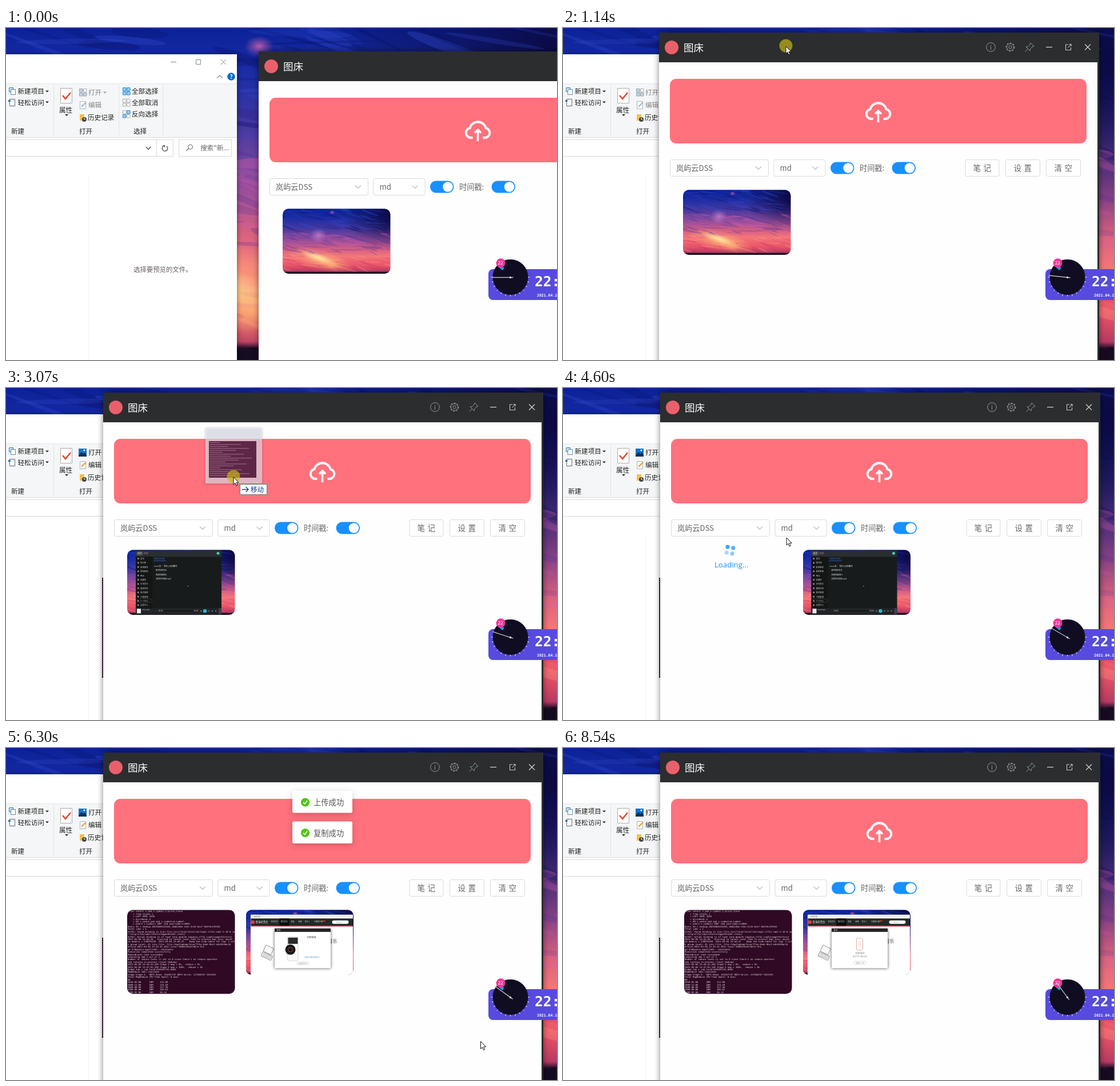
These frames come from a looping animation (964 by 581 pixels, 9.55 s). An HTML page with a canvas:

```html
<!DOCTYPE html>
<html lang="zh">
<head>
<meta charset="utf-8">
<style>
html, body { margin: 0; height: 100%; overflow: hidden; }
canvas { display: block; }
</style>
</head>
<body>
<canvas id="stage" width="964" height="581"></canvas>
<script>
const W = 964, H = 581, LOOP = 9550;
const SANS = '"Noto Sans CJK SC", "Noto Sans CJK", "Noto Sans", sans-serif';
const MONO = '"DejaVu Sans Mono", monospace';
const screen = document.getElementById('stage').getContext('2d');
let c = screen;

// ---------- helpers ----------
const clamp = v => Math.max(0, Math.min(1, v));
const smooth = p => { p = clamp(p); return p * p * (3 - 2 * p); };
const mix = (a, b, p) => a + (b - a) * p;
const lerp = (a, b, p) => [mix(a[0], b[0], p), mix(a[1], b[1], p)];

function rect(x, y, w, h, fill) { c.fillStyle = fill; c.fillRect(x, y, w, h); }

function box(x, y, w, h, r, fill, stroke) {
  c.beginPath(); c.roundRect(x, y, w, h, r);
  if (fill) { c.fillStyle = fill; c.fill(); }
  if (stroke) { c.strokeStyle = stroke; c.lineWidth = 1; c.stroke(); }
}
function dot(x, y, r, fill) { c.beginPath(); c.arc(x, y, r, 0, 7); c.fillStyle = fill; c.fill(); }

function ring(x, y, r, stroke, width = 1) {
  c.beginPath(); c.arc(x, y, r, 0, 2 * Math.PI);
  c.strokeStyle = stroke; c.lineWidth = width; c.stroke();
}
function line(stroke, width, ...points) {
  c.beginPath();
  for (let i = 0; i < points.length; i += 2) c.lineTo(points[i], points[i + 1]);
  c.strokeStyle = stroke; c.lineWidth = width; c.stroke();
}
// y is the vertical centre of the ideographs
function text(s, x, y, size, fill, weight = 400, family = SANS) {
  c.font = `${weight} ${size}px ${family}`;
  c.fillStyle = fill;
  c.fillText(s, x, y + size * .38);
}
function at(x, y, paint) { c.save(); c.translate(x, y); paint(); c.restore(); }

function shadowed(color, blur, dy, paint) {
  c.save();
  c.shadowColor = color; c.shadowBlur = blur; c.shadowOffsetY = dy;
  paint();
  c.restore();
}
function seeded(seed) {
  return () => (seed = (seed * 16807) % 2147483647) / 2147483647;
}

// ---------- sunset wallpaper, painted once ----------
function glow(x, y, r, squash, rgb, alpha, tilt = 0) {
  at(x, y, () => {
    c.rotate(tilt); c.scale(1, squash);
    const g = c.createRadialGradient(0, 0, 0, 0, 0, r);
    g.addColorStop(0, `rgba(${rgb},${alpha})`);
    g.addColorStop(.5, `rgba(${rgb},${alpha * .45})`);
    g.addColorStop(1, `rgba(${rgb},0)`);
    c.fillStyle = g; c.fillRect(-r, -r, 2 * r, 2 * r);
  });
}
function paintSunset() {
  const sheet = document.createElement('canvas');
  sheet.width = W; sheet.height = H;
  c = sheet.getContext('2d');
  const sky = c.createLinearGradient(0, 0, 0, H);
  [[0, '#0b2298'], [.15, '#1e2ea6'], [.3, '#4638a0'], [.42, '#7a479f'], [.52, '#a95298'], [.62, '#d8627f'],
   [.72, '#f4767a'], [.86, '#ea5569'], [.945, '#b83a62'], [.965, '#1d0d26'], [1, '#0b0614']]
    .forEach(s => sky.addColorStop(...s));
  rect(0, 0, W, H, sky);
  glow(1010, 60, 480, .65, '10,4,48', .95);
  glow(340, 450, 300, .3, '255,190,120', .9, .25);
  glow(440, 490, 120, .35, '255,190,110', .7);
  const rnd = seeded(77);
  const tints = [['9,14,95', '50,75,205'], ['215,95,170', '70,45,150'], ['255,165,135', '205,55,105']];
  for (let i = 0; i < 200; i++) {
    const x = rnd() * W, y = rnd() * H * .92, pair = tints[Math.min(2, y / H * 2.8 | 0)];
    c.fillStyle = `rgba(${pair[rnd() * 2 | 0]},${.12 + rnd() * .25})`;
    c.beginPath();
    c.ellipse(x, y, 30 + rnd() * 90, 2 + rnd() * 8, .22 + (rnd() - .5) * .5, 0, 7);
    c.fill();
  }
  glow(443, 32, 26, .7, '215,100,175', .85);
  glow(320, 430, 170, .22, '255,235,165', .95, .32);
  glow(320, 235, 80, .8, '235,150,215', .6);
  for (let x = 0; x < W; x += 9) rect(x, 556 + rnd() * 12, 10, 30, '#160b20');
  c = screen;
  return sheet;
}
const sunset = paintSunset();

// ---------- file explorer ----------
function caret(x, y, fill) {
  c.beginPath(); c.moveTo(x - 3, y - 1.5); c.lineTo(x + 3, y - 1.5); c.lineTo(x, y + 1.5);
  c.fillStyle = fill; c.fill();
}
function tiles(x, y, fills, edge) {
  fills.forEach((f, i) => box(x + .5 + (i % 2) * 7, y + .5 + (i >> 1) * 7, 5.5, 5.5, 0, f, f === '#fff' ? '#aaa' : edge));
}
function explorer(selected) {
  shadowed('rgba(0,0,0,.45)', 9, 1, () => rect(-20, 46, 424, 560, '#fff'));
  line('#888', 1, 288, 59.5, 298, 59.5);
  box(332.5, 55.5, 8, 8, 0, null, '#888');
  line('#888', 1, 376, 55, 385, 64); line('#888', 1, 385, 55, 376, 64);
  line('#888', 1.2, 369.5, 87.5, 374, 83, 378.5, 87.5);
  dot(394, 85, 6.8, '#0b6cc9'); text('?', 391.4, 85, 10, '#fff', 700);

  rect(0, 97, 404, 95, '#f5f6f7');
  rect(0, 97, 404, 1, '#e6e7e8'); rect(0, 191, 404, 1, '#d9dadb');
  for (const x of [83, 197, 274]) rect(x, 101, 1, 87, '#e0e1e3');
  const ink = '#222', pale = selected ? ink : '#838383', blue = '#2b88d0';
  [['新建项目', 20.5, 111], ['轻松访问', 20.5, 131], ['属性', 93, 144], ['历史记录', 143, 157],
   ['全部选择', 220, 111], ['全部取消', 220, 131], ['反向选择', 220, 151],
   ['新建', 9, 181], ['打开', 128, 181], ['选择', 223, 181]].forEach(([s, x, y]) => text(s, x, y, 11.6, ink));
  text('打开', 144, 113, 11.6, pale); text('编辑', 144, 135, 11.6, pale);
  caret(72, 111, ink); caret(72, 130, ink); caret(106, 152.5, ink); caret(173, 113, '#999');

  box(5.5, 104.5, 7, 7, 0, '#cfe6f7', '#2b7db8');
  box(8.5, 107.5, 8, 9, 0, '#fff', '#5d87a5');
  box(6.5, 124.5, 9, 12, 0, '#fff', '#667'); rect(4, 126, 4, 3, '#2677c9');
  box(95.5, 105.5, 20, 26, 0, '#fff', '#aaa');
  line('#e5452f', 2.6, 99, 118, 104, 124, 113, 113);
  if (selected) {
    rect(127, 106, 14, 14, '#1673c9');
    c.beginPath(); c.moveTo(127, 118); c.lineTo(132, 112); c.lineTo(135, 115); c.lineTo(138, 113); c.lineTo(141, 117);
    c.lineTo(141, 120); c.lineTo(127, 120); c.fillStyle = '#0b3157'; c.fill();
    dot(137, 109, 1.5, '#fff');
  } else tiles(128, 106, ['#c7d3dd', '#fff', '#c7d3dd', '#c7d3dd'], '#93a5b3');
  box(129.5, 128.5, 10, 13, 0, '#fff', '#a5b3bd');
  line(selected ? '#e69a1d' : '#9fb3c4', 2, 132, 138, 140, 130);
  rect(129, 151, 8, 11, '#f5c04f'); dot(137, 160, 4, '#444'); line('#fff', 1, 137, 157, 137, 160, 139, 160);
  tiles(204, 104, ['#8fd0f8', '#8fd0f8', '#8fd0f8', '#8fd0f8'], blue);
  tiles(204, 124, ['#fff', '#fff', '#fff', '#fff'], blue);
  tiles(204, 144, ['#fff', '#8fd0f8', '#8fd0f8', '#fff'], blue);

  box(-5.5, 195.5, 298, 29, 0, null, '#d9d9d9'); rect(263, 196, 1, 28, '#d9d9d9');
  line('#555', 1.3, 245, 208, 249, 212.5, 253, 208);
  c.beginPath(); c.arc(278, 210.5, 4.8, -.9, 4.1); c.strokeStyle = '#555'; c.lineWidth = 1.3; c.stroke();
  line('#555', 1.3, 274, 206, 277.5, 206, 277.5, 209);
  box(302.5, 195.5, 92, 29, 0, null, '#d9d9d9');
  ring(322.5, 208, 4, '#666'); line('#666', 1.2, 319.5, 211, 315.5, 215);
  text('搜索"新...', 340, 210, 11.6, '#666');
  rect(144, 260, 1, 321, '#f4f4f4');
  if (selected) {
    rect(168, 332, 200, 175, '#300a24');
    for (let y = 334; y < 505; y += 4) rect(168, y, 1, 2, '#8d7085');
  } else text('选择要预览的文件。', 223, 423, 11.4, '#6b5f60');
}

// ---------- thumbnails ----------
const NAV = ['首页', '排行榜', '歌单推荐', '最新歌曲', '电台', '收藏夹', '本地音乐', '播放列表', '最近播放', '下载管理', '个人中心', '设置中心'];
const LOG = `hive> select s.ymd,s.symbol,s.price_close
    > from stocks s
    > LEFT SEMI JOIN
    > dividends d
    > ON s.ymd=d.ymd and s.symbol=d.symbol
    > where s.symbol='IBM' and year(ymd)>=2000;
Query ID = hadoop_20210404134341_3babc9de-124c-4c33-bec7-5b4f8c193354
Total jobs = 1
SLF4J: Found binding in [jar:file:/usr/local/hive/lib/log4j-slf4j-impl-2.10.0.ja
r!/org/slf4j/impl/StaticLoggerBinder.class]
SLF4J: Actual binding is of type [org.apache.logging.slf4j.Log4jLoggerFactory]
2021-04-04 13:44:36   Starting to launch local task to process map join; maxim
um memory = 239075328  2021-04-04 13:44:37    Dump the side-table for tag: 1 wit
h group count: 41 into file: file:/tmp/hadoop/hive/7f4a-4ede-9bc2-e4e3638ac14
d/hive_2021-04-04_13-43-41_301/-local-10004/HashTable-Sta
ge-3/MapJoin-mapfile01--.hashtable
Execution completed successfully
MapredLocal task succeeded
Launching Job 1 out of 1
Number of reduce tasks is set to 0 since there's no reduce operator
Job running in-process (local Hadoop)
2021-04-04 13:44:41,206 Stage-3 map = 0%,  reduce = 0%
2021-04-04 13:47:01,186 Stage-3 map = 100%,  reduce = 0%
Ended Job = job_local1539397741_0002
MapReduce Jobs Launched:
Stage-Stage-3:  HDFS Read: 116367747 HDFS Write: 117588747 SUCCESS
Total MapReduce CPU Time Spent: 0 msec
OK
2010-02-08      IBM     121.88
2009-11-06      IBM     123.49
2009-08-06      IBM     117.38
2009-05-06      IBM     104.62
2009-02-06      IBM     96.14`.split('\n');

function thumb(x, y, h, paint) {
  at(x, y, () => { c.beginPath(); c.roundRect(0, 0, 188.5, h, 10); c.clip(); paint(); });
}
function wallpaper() { c.drawImage(sunset, 0, 0, 188.5, 115.5); }

function player() {
  wallpaper();
  rect(15, 1, 150, 112, '#181b1b'); rect(15, 1, 150, 11, '#2a2e31'); rect(15, 12, 29, 90, '#141616');
  box(16, 3, 12, 7, 3, '#444a4c');
  text('音乐', 18, 6.5, 4, '#ddd'); text('视频', 29, 6.5, 4, '#888');
  dot(159, 6, 2.5, '#4fc3b0');
  NAV.forEach((s, i) => { rect(18, 14 + i * 7.4, 2.5, 2.5, '#999'); text(s, 23, 15.5 + i * 7.4, 3.4, '#ccc'); });
  box(17.5, 85.5, 26, 6.5, 3, null, '#333');
  text('我的音乐列表', 47, 15.5, 3.2, '#2b78e0'); rect(46, 18.5, 22, 1, '#1d5cb8');
  text('music歌', 47, 28, 3.2, '#ddd'); text('· 我的心动歌单', 60, 28, 3.2, '#ddd'); text('推荐', 81, 28, 3.2, '#ddd');
  ['夜空的轻音乐', '周末的旋律01', '清晨的吉他曲.mp3'].forEach((s, i) => text(s, 50, 35.5 + i * 7.6, 3.2, '#eee'));
  dot(106.5, 63.5, .8, '#bbb');
  rect(15, 102, 150, 10.5, '#222527'); rect(17, 103, 7, 8, '#eee');
  text('music.mp3', 26, 105, 2.6, '#ddd'); text('00:00', 55, 107, 2.8, '#ddd'); text('03:50', 117, 107, 2.8, '#ddd');
  rect(64, 106.5, 51, 1, '#050505');
  dot(136, 107, 3.3, '#25b4d0');
  for (const x of [129, 143, 149, 155]) dot(x, 107, 1, '#999');
  rect(160, 102, 5, 10.5, '#3c4150');
}
function website(scanned) {
  wallpaper();
  rect(8.5, 8.5, 179, 107, '#fff');
  rect(8.5, 8.5, 179, 5.5, '#eef0f2'); text('网页标题', 14, 11.5, 2.8, '#444');
  rect(9, 15, 178.5, 13, '#272727'); rect(59, 15, 17, 13, '#0b0b0b');
  dot(12.5, 21.5, 3.2, '#e33a3f'); text('青禾听音台', 17, 21.5, 4.4, '#fff');
  ['发现音乐', '我的音乐', '朋友', '商城', '音乐人', '下载客户端'].forEach((s, i) =>
    text(s, [44, 61, 79, 92, 103, 119][i], 21, 3.1, '#ddd'));
  rect(134, 18.5, 5, 2, '#d63232');
  box(151, 18.5, 29, 6, 3, '#fff'); text('搜索音乐', 158, 21.5, 2.8, '#999');
  rect(9, 28, 178.5, 1.2, '#c33');
  at(38, 77, () => {
    c.rotate(.45); box(-9, -13, 15, 12, 1, '#fafafa', '#999'); box(-9, 0, 19, 8, 1, '#eee', '#999');
    for (let i = 0; i < 3; i++) line('#aaa', .6, -7, 2 + i * 2, 8, 2 + i * 2);
  });
  text('听音乐', 136, 55, 8, '#444');
  shadowed('rgba(0,0,0,.7)', 5, 1, () => rect(50.5, 32.5, 98, 69.5, '#fff'));
  rect(50.5, 32.5, 98, 6, '#222'); text('登录', 54, 35.5, 3.4, '#fff');
  if (scanned) {
    box(94, 49.5, 11, 21, 2, '#fff', '#e9a9a0'); rect(96, 55, 7, 9, '#fbeeea');
    text('扫码成功', 92, 76, 4, '#777'); text('请在手机上确认登录', 87, 82, 2.9, '#888');
    box(89, 90, 22, 5, 2, '#fff', '#ddd'); text('返回上一步', 93, 92.5, 2.8, '#777');
  } else {
    box(73, 47, 18.5, 42, 2, '#fafafa', '#d8d8d8');
    rect(74, 48.5, 17, 11, '#2a2a2a'); dot(78, 69.5, 9, '#151515'); ring(78, 69.5, 4, '#b85a5a', .8);
    text('扫码登录', 107, 48, 4, '#333');
    text('使用手机客户端扫码', 103, 83, 2.8, '#3b78c0');
    box(89, 91, 22, 5, 2, '#fff', '#ddd'); text('其他登录方式', 92, 93.5, 2.6, '#777');
  }
}
function terminal() {
  rect(0, 0, 189, 150, '#300a24');
  LOG.forEach((s, i) => text(s, 1, 2.6 + i * 4.42, 3.9, '#e6dfe4', 400, MONO));
}

// ---------- upload window ----------
const CLOUD = new Path2D('M-9 12H-12A8.6 8.6 0 0 1-14-5A14.5 14.5 0 0 1 14-5A8.6 8.6 0 0 1 12 12H9');

function titleIcons() {
  const g = '#999';
  ring(580.5, 25.5, 7.8, g); rect(580, 24, 1, 6, g); rect(580, 21.5, 1, 1.5, g);
  ring(614.5, 25.5, 2.6, g); ring(614.5, 25.5, 6, g, .9);
  c.setLineDash([2.6, 2.9]); ring(614.5, 25.5, 7.2, g, 1.3); c.setLineDash([]);
  line(g, 1, 650, 18, 656, 24, 653, 25, 649.5, 28.5, 649, 32, 642, 25, 645.5, 24.5, 649, 21, 650, 18);
  line(g, 1, 645.5, 28.5, 640.5, 33.5);
  line('#d8d8d8', 1.2, 677, 25.5, 688, 25.5);
  line('#c8c8c8', 1.1, 716, 21, 711.5, 21, 711.5, 30.5, 720.5, 30.5, 720.5, 26);
  line('#c8c8c8', 1.1, 715.5, 26.5, 721, 20.5); line('#c8c8c8', 1.1, 717.5, 20.5, 721, 20.5, 721, 24);
  line('#d8d8d8', 1.1, 745, 20.5, 755, 30.5); line('#d8d8d8', 1.1, 755, 20.5, 745, 30.5);
}
const LABEL = '#666';
function select(x, w, label) {
  box(x + .5, 222.5, w, 29, 3, '#fff', '#d9d9d9');
  text(label, x + 11, 237, 13.2, LABEL, 300);
  line('#bbb', 1.1, x + w - 22, 234.5, x + w - 17, 239.5, x + w - 12, 234.5);
}
function toggle(x) { box(x, 226.5, 41.5, 21, 10.5, '#1890ff'); dot(x + 31, 237, 8.8, '#fff'); }

function button(x, w, label) {
  box(x + .5, 222.5, w, 29, 3, '#fff', '#d9d9d9');
  text(label[0], x + w / 2 - 15.5, 237, 13.5, LABEL, 300);
  text(label[1], x + w / 2 + 2.5, 237, 13.5, LABEL, 300);
}
function spinner(t) {
  at(292, 284, () => {
    c.rotate((10 + (t - 4600) * .3) * Math.PI / 180);
    [[-5, -5], [5, -5], [5, 5], [-5, 5]].forEach(([x, y], i) => {
      c.globalAlpha = .3 + .6 * Math.abs(1 - (((t - 4700) / 1000 + i * .4 + 20) % 2));
      dot(x, y, 3.6, '#1890ff');
    });
  });
  text('Loading...', 265, 309, 13.2, '#1890ff', 400, '"Open Sans", sans-serif');
}
function uploader(t) {
  shadowed('rgba(0,0,0,.5)', 10, 0, () => rect(0, 0, 770, 620, '#2c2d2f'));
  rect(0, 52, 767, 560, '#fefefe');
  dot(22, 26, 12, '#e9606b');
  text('图床', 43, 26, 17.6, '#fff');
  titleIcons();
  box(19, 81, 729, 113, 11, '#ff717c');
  at(383.5, 139, () => {
    c.strokeStyle = '#fff'; c.lineWidth = 4; c.stroke(CLOUD);
    line('#fff', 3.6, 0, 18, 0, -2); line('#fff', 3.6, -5.5, 3.5, 0, -2, 5.5, 3.5);
  });
  select(19, 172, '岚屿云DSS');
  select(200.5, 90, 'md');
  toggle(300); text('时间戳:', 351, 237, 13.2, LABEL, 300); toggle(407.5);
  button(535.5, 59, '笔记'); button(606, 60, '设置'); button(677, 60, '清空');
  const gallery = t < 1450 ? wallpaper : t < 5380 ? player : () => website(t > 7760);
  thumb(t < 3600 ? 42 : 249.5, 275.3, 113.7, gallery);
  if (t >= 5160) thumb(42, 275.3, 147, terminal);
}
function toast(t, label, y, from, to) {
  const show = Math.min(smooth((t - from) / 250), 1 - smooth((t - to) / 300));
  if (show <= 0) return;
  at(0, y - 22 * (1 - show), () => {
    c.globalAlpha = show;
    shadowed('rgba(0,0,0,.2)', 12, 3, () => box(501, 0, 105, 38.5, 3, '#fff'));
    dot(523.5, 20, 7.6, '#52c41a');
    line('#fff', 1.6, 520, 20, 522.7, 23, 527, 17);
    text(label, 538, 20, 13.3, '#555', 300);
  });
}

// ---------- clock widget ----------
function clock(t) {
  box(844, 422, 140, 54, 8, '#574bdf');
  at(882.5, 436, () => {
    shadowed('rgba(0,0,0,.2)', 4, 0, () => dot(0, 0, 31, '#100d22'));
    for (let a = 0; a <= 12; a++) {
      const r = a * Math.PI / 12, x = Math.cos(r), y = Math.sin(r);
      line('#fff', 1, x * 31, y * 31, x * 33.8, y * 33.8);
    }
  });
  line('#1a9cf2', 5, 862, 415, 870, 422);
  dot(865.5, 411.3, 8, '#f2349b'); text('22', 860.8, 411.3, 8, '#fff');
  at(882.5, 436.5, () => {
    c.rotate(Math.floor((t + 470) / 1000) * Math.PI / 30);
    line('#b9b9bd', 1.4, -33, 0, 5, 0); dot(0, 0, 1.6, '#fff');
  });
  text('22:', 925, 443, 24.5, '#fff', 700, MONO);
  text('2021.04.17', 929, 467.5, 6.5, '#fff', 700, MONO);
}

// ---------- pointer ----------
const GRAB = [222, 24], FILE = [-20, 305], DROP = [398, 156], REST = [391, 262];
const ARROW = new Path2D('M0 0V13L3 10.2L5 15L7.2 14L5.2 9.4H9.2Z');

// whole pixels, as a desktop moves its windows
function windowAt(t) {
  const pos = t < 990 ? lerp([442, 41], [161, 9], smooth((t - 70) / 920))
                      : lerp([161, 9], [170, 8], smooth((t - 990) / 230));
  return pos.map(Math.round);
}
function pointerAt(t, win) {
  if (t < 1300) return [win[0] + GRAB[0], win[1] + GRAB[1]];
  if (t < 2380) return lerp([392, 32], FILE, smooth((t - 1300) / 550));
  if (t < 3530) return lerp(FILE, DROP, smooth((t - 2380) / 620));
  if (t < 5450) return lerp(DROP, REST, smooth((t - 3530) / 800));
  return lerp(REST, [938, 575], 1 - (1 - clamp((t - 5530) / 1080)) ** 1.3);
}
function dragged() {
  shadowed('rgba(80,20,40,.4)', 4, 1, () => box(-49, -87, 99, 98, 2, 'rgba(226,240,248,.62)'));
  rect(-43, -63, 83, 64, 'rgba(82,24,58,.9)');
  for (let i = 0; i < 18; i++) rect(-42, -61 + i * 3.4, 18 + (i * 37) % 60, 1, 'rgba(225,185,205,.5)');
}
function dragLabel() {
  box(11.5, 12.5, 47, 18, 0, '#fff', '#777');
  line('#123a8c', 1.3, 15, 21.5, 26, 21.5); line('#123a8c', 1.3, 21.5, 17, 26, 21.5, 21.5, 26);
  text('移动', 30, 21.5, 11.6, '#123a9c');
}
function pointer(t, win) {
  if (t < 70 || t >= 6610) return;
  const dragging = t >= 2380 && t < 3530;
  at(...pointerAt(t, win), () => {
    if (dragging) dragged();
    if (t < 1220 || (t > 2250 && t < 3530)) dot(0, -1, 11.5, 'rgba(200,185,20,.68)');
    c.fillStyle = '#fff'; c.fill(ARROW);
    c.strokeStyle = '#111'; c.lineWidth = 1; c.stroke(ARROW);
    if (dragging) dragLabel();
  });
}

function draw(now) {
  const t = now % LOOP, win = windowAt(t);
  c.drawImage(sunset, 0, 0);
  explorer(t >= 2300);
  at(...win, () => uploader(t));
  if (t >= 3600 && t < 4760) spinner(t);
  toast(t, '上传成功', 75, 4680, 7680);
  toast(t, '复制成功', 128.5, 4800, 7760);
  clock(t);
  pointer(t, win);
}
const start = performance.now();
(function tick() {
  draw(performance.now() - start);
  requestAnimationFrame(tick);
})();
</script>
</body>
</html>
```
